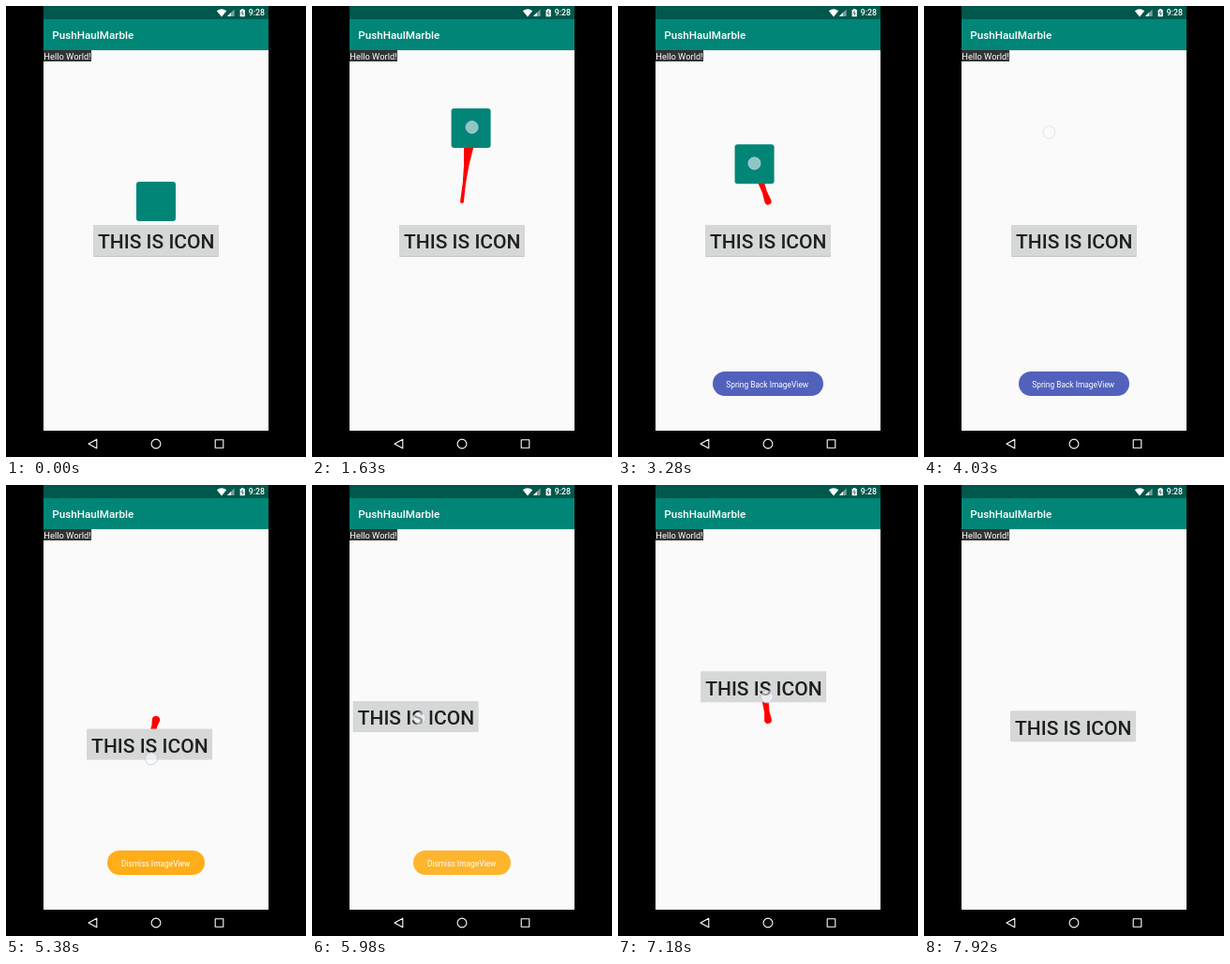
Write an HTML page that moves like this. It is 320 px wide and 480 px high and loops after 8 s.

```html
<!DOCTYPE html>
<html lang="en">
<head>
<meta charset="utf-8">
<title>Drag demo</title>
<style>
  html, body { margin: 0; width: 100%; height: 100%; overflow: hidden; background: #000; }
  svg { display: block; width: 100%; height: 100%; }
  text { font-family: Roboto, "Open Sans", sans-serif; fill: #fff; }
  .medium { font-weight: 500; }
  .mid { text-anchor: middle; }
  .nav { fill: none; stroke: #fff; stroke-width: 1.1; stroke-linejoin: round; }
</style>
</head>
<body>
<svg viewBox="0 0 320 480">
  <defs>
    <linearGradient id="shade" x2="0" y2="1">
      <stop offset="0" stop-color="#000" stop-opacity=".08"/>
      <stop offset="1" stop-color="#000" stop-opacity="0"/>
    </linearGradient>
  </defs>

  <rect width="320" height="480"/>
  <rect x="40" y="14" width="240" height="438" fill="#fafafa"/>
  <rect x="40" y="47" width="51" height="12" fill="#333"/>
  <text x="40.3" y="56.8" font-size="9.33">Hello World!</text>

  <!-- bars -->
  <rect x="40" width="240" height="14" fill="#00574b"/>
  <rect x="40" y="14" width="240" height="33" fill="#008577"/>
  <rect x="40" y="47" width="240" height="2" fill="url(#shade)"/>
  <text class="medium" x="49.3" y="35" font-size="11.67">PushHaulMarble</text>
  <g fill="#fff">
    <path d="M224.8 5.2Q230 1.2 235.2 5.2L230 11.4Z"/>
    <path d="M243.6 3.4V11H236Z" opacity=".45"/>
    <path d="M240 7L236 11H240Z"/>
    <path d="M249.6 4H251V3H253.4V4H254.8V11.2H249.6Z"/>
  </g>
  <path d="M252.6 5L251 7.7H253.2L251.8 10.2" fill="none" stroke="#00574b" stroke-width=".8"/>
  <text class="medium" x="276" y="10.4" font-size="8.75" text-anchor="end">9:28</text>

  <g class="nav">
    <path d="M88 466L96.8 461.2V470.8Z"/>
    <circle cx="160" cy="466" r="4.9"/>
    <rect x="223.2" y="461.7" width="8.6" height="8.6"/>
  </g>

  <!-- draggable views -->
  <path id="tail" fill="#f00"/>
  <g id="button">
    <rect id="lift" x="93" y="233.6" width="134" height="33.4" rx="1.5" fill="#c4c4c4"/>
    <rect x="93" y="233" width="134" height="33" rx="1.2" fill="#d6d7d7"/>
    <text class="medium mid" x="160.3" y="258.4" font-size="21" style="fill:#1e1e1e">THIS IS ICON</text>
  </g>
  <rect id="icon" x="139" y="187" width="42" height="42" rx="3" fill="#008577"/>

  <g id="back" class="mid">
    <rect x="101" y="389" width="118" height="26" rx="13" fill="#5262bc"/>
    <text x="159.2" y="405.8" font-size="8.4">Spring Back ImageView</text>
  </g>
  <g id="gone" class="mid">
    <rect x="108" y="389" width="104" height="26" rx="13" fill="#ffae19"/>
    <text x="159.6" y="405.8" font-size="8.4">Dismiss ImageView</text>
  </g>

  <circle id="touch" r="6.5" fill="#fff" fill-opacity=".55" stroke="#c3c6e6" stroke-opacity=".85"/>
</svg>

<script>
const LOOP = 8000, STEP = 75, SPRING = 500, FADE = 150, LEAD = 50, REACH = 80;
const el = id => document.getElementById(id);
const [tail, button, lift, icon, back, gone, touch] =
  ['tail', 'button', 'lift', 'icon', 'back', 'gone', 'touch'].map(el);

// pull: [time, angle in degrees, distance]; grip: finger offset from the view's centre
const drags = [
  { view: icon, home: [160, 208], grip: [1, -1], up: 1950,
    pull: [[500, 277, 0], [1250, 277, 78.6]] },
  { view: icon, home: [160, 208], grip: [1.5, 3.5], up: 3960,
    pull: [[2825, 250, 0], [3700, 250, 82]] },
  { view: button, home: [160, 250], grip: [3, 12], up: 7760,
    pull: [[4900, 98, 0], [5680, 109, 45], [6275, 259, 54], [6500, 297, 31],
      [6800, 458, 25], [7175, 622, 35], [7625, 638, 51]] }
];

const clamp = v => Math.max(0, Math.min(1, v));
const mix = (a, b, p) => a + (b - a) * p;

function pulled(keys, t) {
  const next = keys.findIndex(k => k[0] > t);
  const i = next < 0 ? keys.length - 1 : Math.max(1, next);
  const [a, b] = [keys[i - 1], keys[i]];
  const p = clamp((t - a[0]) / (b[0] - a[0]));
  const angle = mix(a[1], b[1], p) * Math.PI / 180, dist = mix(a[2], b[2], p);
  return [Math.cos(angle) * dist, Math.sin(angle) * dist];
}

// remaining share of the pull during an overshooting return
function recoil(p) {
  const u = clamp(p) - 1;
  return -u * u * (4 * u + 3);
}

// two discs joined by curves that pinch towards the midpoint
function tailPath([ax, ay], [dx, dy]) {
  const dist = Math.hypot(dx, dy);
  if (dist < 1 || dist > REACH) return '';
  const r = 5.5 - dist / 22, R = 9;
  const nx = -dy / dist, ny = dx / dist, bx = ax + dx, by = ay + dy;
  const mid = `${ax + dx / 2} ${ay + dy / 2}`;
  return `M${ax + nx * r} ${ay + ny * r}Q${mid} ${bx + nx * R} ${by + ny * R}` +
    `L${bx - nx * R} ${by - ny * R}Q${mid} ${ax - nx * r} ${ay - ny * r}` +
    `A${r} ${r} 0 0 0 ${ax + nx * r} ${ay + ny * r}Z`;
}

const fade = (t, a, b, c, d) => clamp((t - a) / (b - a)) * (1 - clamp((t - c) / (d - c)));

function draw(t) {
  const d = drags.find(g => t >= g.pull[0][0] && t < g.up + SPRING);
  let shape = '', tap = 0;
  for (const v of [icon, button]) v.removeAttribute('transform');
  if (d) {
    const share = t > d.up ? recoil((t - d.up) / SPRING) : 1;
    const pos = pulled(d.pull, t).map(v => v * share);
    const finger = pulled(d.pull, t + LEAD);
    d.view.setAttribute('transform', `translate(${pos})`);
    shape = tailPath(d.home, pos);
    touch.setAttribute('cx', d.home[0] + d.grip[0] + finger[0]);
    touch.setAttribute('cy', d.home[1] + d.grip[1] + finger[1]);
    tap = 1 - clamp((t - d.up) / FADE);
  }
  // letting go beyond reach dismisses the icon
  const dismissed = t >= drags[1].up;
  if (dismissed && d === drags[1]) shape = '';
  tail.setAttribute('d', shape);
  touch.setAttribute('opacity', tap);
  lift.setAttribute('opacity', d && d.view === button ? 0 : 1);
  icon.setAttribute('opacity', dismissed ? 0 : 1);
  back.setAttribute('opacity', fade(t, 2590, 2780, 4220, 4475));
  gone.setAttribute('opacity', fade(t, 4235, 4475, 5950, 6200));
}

const start = performance.now();
function tick() {
  const t = (performance.now() - start) % LOOP;
  // the picture advances in even ticks after the opening pause
  draw(t < 494 ? 0 : 500 + STEP * Math.floor((t - 494) / STEP));
  requestAnimationFrame(tick);
}
tick();
</script>
</body>
</html>
```
